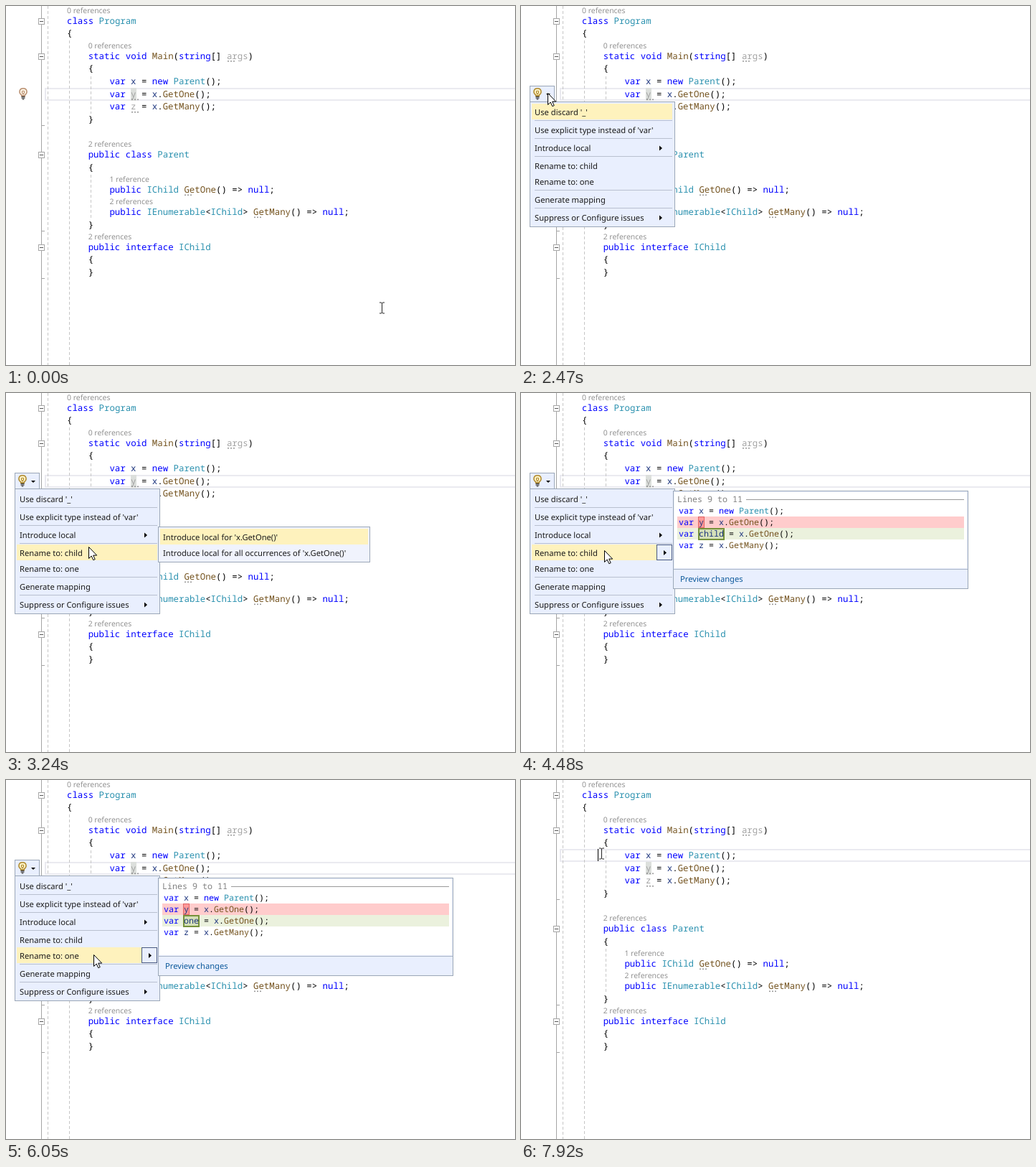
Animation of 710x500 px, one loop 8000 ms. Source, as an HTML page:

```html
<!DOCTYPE html>
<html lang="en">
<head>
<meta charset="utf-8">
<title>Rename suggestions</title>
<style>
html, body { margin: 0; width: 100%; height: 100%; overflow: hidden; background: #fff; }
svg { display: block; width: 710px; height: 500px; }
text { text-rendering: geometricPrecision; white-space: pre; }
.code { font: 12.4px "Noto Sans Mono", monospace; }
.small { font: 11.67px "Noto Sans Mono", monospace; }
.lens { font: 10.45px "Noto Sans", sans-serif; fill: #929292; }
.ui { font: 11.2px "Noto Sans", sans-serif; fill: #1b1b1b; }
.k { fill: #0000ff; }
.t { fill: #2b91af; }
.m { fill: #74531f; }
.v, .u { fill: #1f377f; }
.g { fill: #a3a3a3; }
.raw .t, .raw .m, .raw .u { fill: #000; }
</style>
</head>
<body>
<svg id="stage" viewBox="0 0 710 500" xmlns="http://www.w3.org/2000/svg"></svg>
<script>
const LOOP = 8000, STEP = 155, EDGE = '#9ba7b7', PANEL = '#e9effe', HOT = '#fef2bd';
const INDENT = [85, 114.7, 144.4], CELL = 7.43;
const ROWS = [136, 161, 186, 211, 233, 258, 283];
const ITEMS = ["Use discard '_'", "Use explicit type instead of 'var'", 'Introduce local',
  'Rename to: child', 'Rename to: one', 'Generate mapping', 'Suppress or Configure issues'];

const esc = s => s.replace(/&/g, '&amp;').replace(/</g, '&lt;').replace(/>/g, '&gt;');
const rect = (x, y, w, h, fill, more = '') =>
  `<rect x="${x}" y="${y}" width="${w}" height="${h}" fill="${fill}" ${more}/>`;
const box = (x, y, w, h, fill, stroke, sw = 1) =>
  rect(x + sw / 2, y + sw / 2, w - sw, h - sw, fill, `stroke="${stroke}" stroke-width="${sw}"`);
const path = (d, stroke, more = '') => `<path d="${d}" fill="none" stroke="${stroke}" ${more}/>`;
const label = (x, y, s, cls, more = '') => `<text x="${x}" y="${y}" class="${cls}" ${more}>${esc(s)}</text>`;
const group = (id, body) => `<g id="${id}">${body}</g>`;
const tri = (x, y) => `<path d="M${x} ${y - 3.5}l4 3.5l-4 3.5z"/>`;

// Places each token on the monospace grid and colours it by its role.
function kind(word, after, faded) {
  if (/^(class|static|void|string|var|new|public|null|interface)$/.test(word)) return 'k';
  if (/^(Program|Parent|IChild|IEnumerable)$/.test(word)) return 't';
  if (/^(Main|GetOne|GetMany)$/.test(word)) return 'm';
  if (faded && /^(args|y|z)$/.test(word)) return 'g';
  if (/^\w/.test(word)) return after === '.' ? 'u' : 'v';
  return '';
}
function code(x, y, s, small) {
  const w = small ? 7 : CELL;
  return [...s.matchAll(/\w+|[^\w\s]+/g)].map(m => {
    const c = kind(m[0], s[m.index + m[0].length], !small);
    return label((x + m.index * w).toFixed(2), y, m[0], (small ? 'small ' : 'code ') + c);
  }).join('');
}
const dots = (x, y) => [0, 4, 8].map(d => rect(x + d, y, 2, 1.6, '#9c9c9c')).join('');

function bulb(x, y, line, fill) {
  return `<g transform="translate(${x} ${y})">
    <path d="M-2.3 5.2V4C-6.5 1.5 -6 -5.2 0 -5.2S6.5 1.5 2.3 4V5.2Z" fill="${fill}" stroke="${line}" stroke-width="1.5"/>
    <path d="M0 5V1.5M-1.5 -1.5h3v3h-3z" fill="none" stroke="${line}"/>
    <path d="M-2.5 6.3h5M-2.5 8.2h5M-1.3 9.8h2.6" stroke="#424242" stroke-width="1.3"/></g>`;
}

function gutter() {
  let s = path('M49.5 0V500M50 166.5h4M50 313.5h4M50 379.5h4', '#a5a5a5');
  for (const y of [21, 70, 207, 336])
    s += box(45, y - 4, 9, 9, '#fff', '#a5a5a5') + path(`M47 ${y + .5}h5`, '#555');
  return s + path('M58.5 0V500M88.5 48V500M118.5 98V150M118.5 235V296', '#c6c6c6', 'stroke-dasharray="4 3"');
}

function editor() {
  const lines = [
    [0, 25, 'class Program'], [0, 42, '{'],
    [1, 74, 'static void Main(string[] args)'], [1, 91, '{'],
    [2, 109, 'var x = new Parent();'], [2, 127, 'var y = x.GetOne();'],
    [2, 144, 'var z = x.GetMany();'], [1, 162, '}'],
    [1, 211, 'public class Parent'], [1, 229, '{'],
    [2, 260, 'public IChild GetOne() => null;'],
    [2, 291, 'public IEnumerable<IChild> GetMany() => null;'], [1, 309, '}'],
    [1, 340, 'public interface IChild'], [1, 357, '{'], [1, 375, '}']
  ];
  const lenses = [[0, 10, 0], [1, 59, 0], [1, 196, 2], [2, 245, 1], [2, 276, 2], [1, 325, 2]];
  return rect(174, 114, 8, 18, '#dcdfdc') +
    lines.map(([i, y, s]) => code(INDENT[i], y, s)).join('') +
    lenses.map(([i, y, n]) => label(INDENT[i], y, `${n} reference${n === 1 ? '' : 's'}`, 'lens')).join('') +
    dots(309, 76) + dots(175, 129.5) + dots(175, 147) + dots(249, 262.5) + dots(346, 293.5);
}

function menu() {
  return box(12, 133, 203, 175, PANEL, EDGE) +
    rect(15, 0, 196, 22, HOT, 'id="hot"') +
    path([159.5, 184.5, 209.5, 256.5, 281.5].map(y => `M19 ${y}H211`).join(''), '#b9c0cf') +
    ITEMS.map((s, i) => label(19, ROWS[i] + 16, s, 'ui')).join('') +
    tri(193, 198) + tri(193, 295) +
    group('more', box(189, 0, 22, 22, PANEL, '#4a5a80') + tri(199, 11.5));
}

function submenu() {
  return box(212, 186, 296, 50, '#f0f3fd', EDGE) + rect(215, 189, 290, 22, HOT) +
    label(219, 205, "Introduce local for 'x.GetOne()'", 'ui') +
    label(219, 227, "Introduce local for all occurrences of 'x.GetOne()'", 'ui');
}

function preview() {
  const named = name => group('as-' + name,
    box(247, 188, name.length * 7 + 2, 17, '#d5e0b8', '#76923c', 2) +
    code(220, 200, `var ${name} = x.GetOne();`, true));
  return box(212, 136, 412, 137, PANEL, EDGE) + rect(214, 138, 408, 106, '#fff') +
    path('M213 245.5H623', '#a9b4c6') +
    label(218, 152, 'Lines 9 to 11', 'small', 'fill="#808080"') + path('M314 148.5H618', '#9a9a9a') +
    rect(218, 172, 400, 16, '#ffcccc') + rect(218, 188, 400, 16, '#ebf1dd') +
    box(247, 172, 9, 16, '#ff9999', '#e06464') +
    code(220, 168, 'var x = new Parent();', true) +
    code(220, 184, 'var y = x.GetOne();', true) +
    named('child') + named('one') +
    code(220, 216, 'var z = x.GetMany();', true) +
    label(222, 263, 'Preview changes', 'ui', 'style="fill:#0e5a9c"');
}

const beam = 'M-3.5 -7.5H-1L0 -6.5L1 -7.5H3.5M0 -6.5V6.5M-3.5 7.5H-1L0 6.5L1 7.5H3.5';
document.getElementById('stage').innerHTML =
  rect(0, 0, 710, 500, '#fff') +
  group('current', path('M710 115H55V131H710', '#eaeaf0', 'stroke-width="2"')) +
  gutter() + editor() +
  group('caret', rect(0, 0, 1, 17, '#000')) +
  group('hint', bulb(24, 120, '#b98f70', '#fdf3e4')) +
  group('button', box(12, 111, 35, 23, PANEL, EDGE) + bulb(23, 120, '#b08a2c', '#fbf0c4') +
    '<path d="M35 122h6l-3 3z"/>') +
  group('menu', menu()) + group('sub', submenu()) + group('preview', preview()) +
  group('beam', path(beam, '#222')) +
  group('arrow', '<path d="M.5 .5V16.5L4.2 13L6.8 18.7L9.2 17.6L6.7 12.1H11.7Z" fill="#fff" stroke="#000"/>');

const el = id => document.getElementById(id);
const show = (id, on) => el(id).setAttribute('display', on ? 'inline' : 'none');
const move = (id, x, y) => el(id).setAttribute('transform', `translate(${x} ${y})`);

// Each move: start time, number of steps, end point.
const MOVES = [[140, 5, 186, 125], [1380, 5, 37, 121], [2620, 5, 115, 214],
  [3400, 2, 116, 219], [4790, 3, 122, 243], [7290, 4, 112, 102]];

function pointer(t) {
  let x = 524, y = 420;
  for (const [start, n, toX, toY] of MOVES) {
    if (t < start) break;
    const p = Math.min(1, (Math.floor((t - start) / STEP) + 1) / n);
    const e = p * p * (3 - 2 * p);
    x += (toX - x) * e;
    y += (toY - y) * e;
  }
  return [Math.round(x), Math.round(y)];
}

function render(t) {
  const within = (a, b) => t >= a && t < b;
  const [x, y] = pointer(t);
  const open = within(2300, 7760), pressed = within(2000, 7760), left = t >= 7910;
  const row = Math.max(0, ROWS.filter(top => top <= y).length - 1);

  move('current', 0, left ? -18 : 0);
  show('caret', within(1070, 1600) || left);
  move('caret', left ? 107 : 182, left ? 96 : 114);
  show('hint', t < 2000);
  show('button', pressed);
  show('menu', open);
  el('hot').setAttribute('y', ROWS[row]);
  show('more', within(3860, 4950) || within(5890, 7290));
  move('more', 0, ROWS[row]);
  show('sub', within(3080, 3550));
  show('preview', within(3860, 5110) || within(5890, 7760));
  show('as-child', t < 5110);
  show('as-one', t >= 5110);
  el('preview').setAttribute('class', t < 4480 || within(5110, 6050) ? 'raw' : '');
  show('arrow', pressed);
  show('beam', !pressed);
  move('arrow', x, y);
  move('beam', x + .5, y + .5);
}

const begin = performance.now();
function tick(now) {
  render(Math.max(0, now - begin) % LOOP);
  requestAnimationFrame(tick);
}
render(0);
requestAnimationFrame(tick);
</script>
</body>
</html>
```
